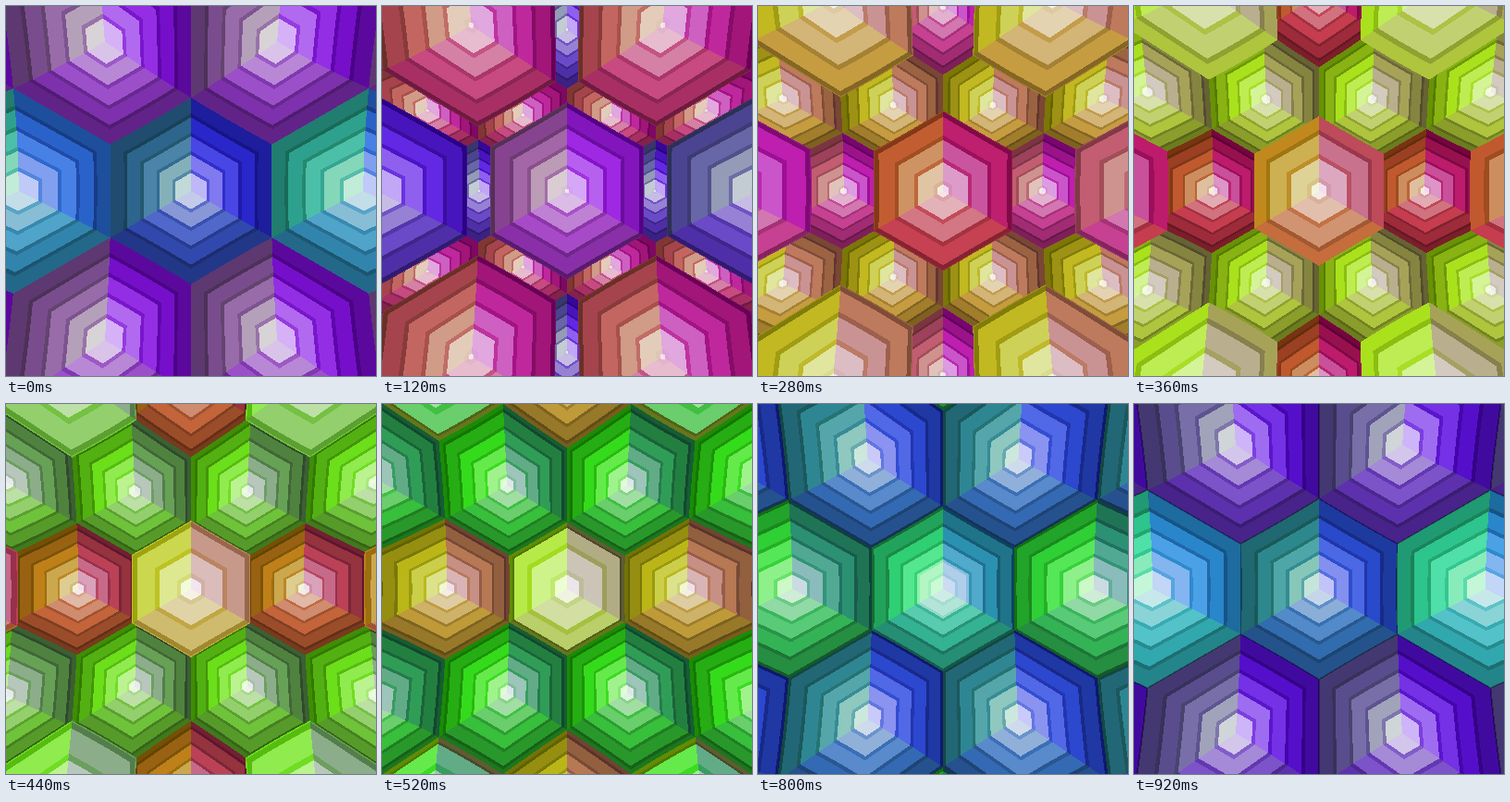
These frames come from a looping animation (400x400 px, 960 ms). An HTML page with a canvas:

```html
<!DOCTYPE html>
<html>
<head>
<meta charset="utf-8">
<style>
html, body { margin: 0; width: 100%; height: 100%; overflow: hidden; background: #223; }
canvas { display: block; width: 400px; height: 400px; }
</style>
</head>
<body>
<canvas id="stage" width="400" height="400"></canvas>
<script>
const SIZE = 400, LOOP = 960, STEP = 40;
const SPACING = 169, BULGE = 3.6e-6, RINGS = 5, BAND = 0.2;
const H = Math.sqrt(3) / 2;
const CELL_HUE = [0, -29, 49];                               // by lattice parity
const TINT = [[-4, 28, -32], [-8, -34, 28], [0, 0, 0]];      // left, right, bottom

const ctx = document.getElementById('stage').getContext('2d');
const image = ctx.createImageData(SIZE, SIZE);
const out = image.data;

// Lens correction, computed once per pixel.
const px = new Float32Array(SIZE * SIZE), py = new Float32Array(SIZE * SIZE);
for (let i = 0; i < px.length; i++) {
  const x = i % SIZE + 0.5 - SIZE / 2;
  const y = Math.floor(i / SIZE) + 0.5 - SIZE / 2;
  const far = Math.hypot(x, y);
  let r = far;
  for (let n = 0; n < 6; n++) {
    r -= (r * (1 + BULGE * r * r) - far) / (1 + 3 * BULGE * r * r);
  }
  px[i] = x * r / far;
  py[i] = y * r / far;
}

function hsl(h, s, l) {
  const a = s * Math.min(l, 1 - l);
  return [0, 8, 4].map(n => {
    const k = (((n + h / 30) % 12) + 12) % 12;
    return 255 * (l - a * Math.max(-1, Math.min(k - 3, 9 - k, 1)));
  });
}

// Colours for every cell kind, face, ring and shadow band.
function palette(p) {
  const list = [];
  const hue = 228 + 360 * p + 12 * Math.sin(Math.PI * p) + 10 * Math.sin(2 * Math.PI * p);
  for (let kind = 0; kind < 3; kind++)
    for (let face = 0; face < 3; face++)
      for (let ring = 0; ring < 8; ring++)
        for (let band = 0; band < 2; band++) {
          const age = ring + p;
          const light = Math.min(0.93, 1.01 - 0.18 * age + 0.009 * age * age);
          const shade = band ? 1 - 0.18 * Math.max(0, Math.min(1, age - 1)) : 1;
          const tint = Math.min(1, 0.2 + age * 0.35) * (age > 4 ? 0.75 : 1);
          const rgb = hsl(hue + CELL_HUE[kind], 0.42 + 0.035 * age, light * shade);
          list.push(rgb.map((v, c) => v + TINT[face][c] * tint));
        }
  return list;
}

const hit = { u: 0, color: 0 };

function locate(x, y, s, p) {
  const fb = y / (s * H), fa = x / s - fb / 2, fc = -fa - fb;
  let a = Math.round(fa), b = Math.round(fb);
  const c = Math.round(fc);
  const da = Math.abs(a - fa), db = Math.abs(b - fb), dc = Math.abs(c - fc);
  if (da > db && da > dc) a = -b - c;
  else if (db > dc) b = -a - c;
  const dx = x - s * (a + b / 2), dy = y - s * H * b;
  const ax = Math.abs(dx);
  const u = Math.max(ax, ax / 2 + Math.abs(dy) * H) * 2 / s;
  const kind = b & 1 ? 2 : a & 1;
  const face = dy * 2 * H > ax ? 2 : dx < 0 ? 0 : 1;
  const phase = RINGS * u - p, floor = Math.floor(phase);
  const band = phase - floor < BAND ? 1 : 0;
  hit.u = u;
  hit.color = ((kind * 3 + face) * 8 + floor + 1) * 2 + band;
}

function draw(p) {
  const colors = palette(p);
  const big = SPACING * Math.pow(2, p), small = big / 2;
  const edge = 1 - p, alpha = Math.min(1, edge * 3.4);
  for (let i = 0, o = 0; i < px.length; i++, o += 4) {
    locate(px[i], py[i], big, p);
    const covered = p === 0 || hit.u < edge;
    const top = colors[hit.color];
    let base = top, mix = 1;
    if (!covered || alpha < 1) {
      locate(px[i], py[i], small, p);
      base = colors[hit.color];
      mix = covered ? alpha : 0;
    }
    for (let c = 0; c < 3; c++) out[o + c] = base[c] + (top[c] - base[c]) * mix;
    out[o + 3] = 255;
  }
  ctx.putImageData(image, 0, 0);
}

let start = null, last = -1;
function tick(now) {
  if (start === null) start = now;
  const step = Math.floor(((now - start) % LOOP) / STEP);
  if (step !== last) draw(step * STEP / LOOP);
  last = step;
  requestAnimationFrame(tick);
}
draw(0);
requestAnimationFrame(tick);
</script>
</body>
</html>
```
